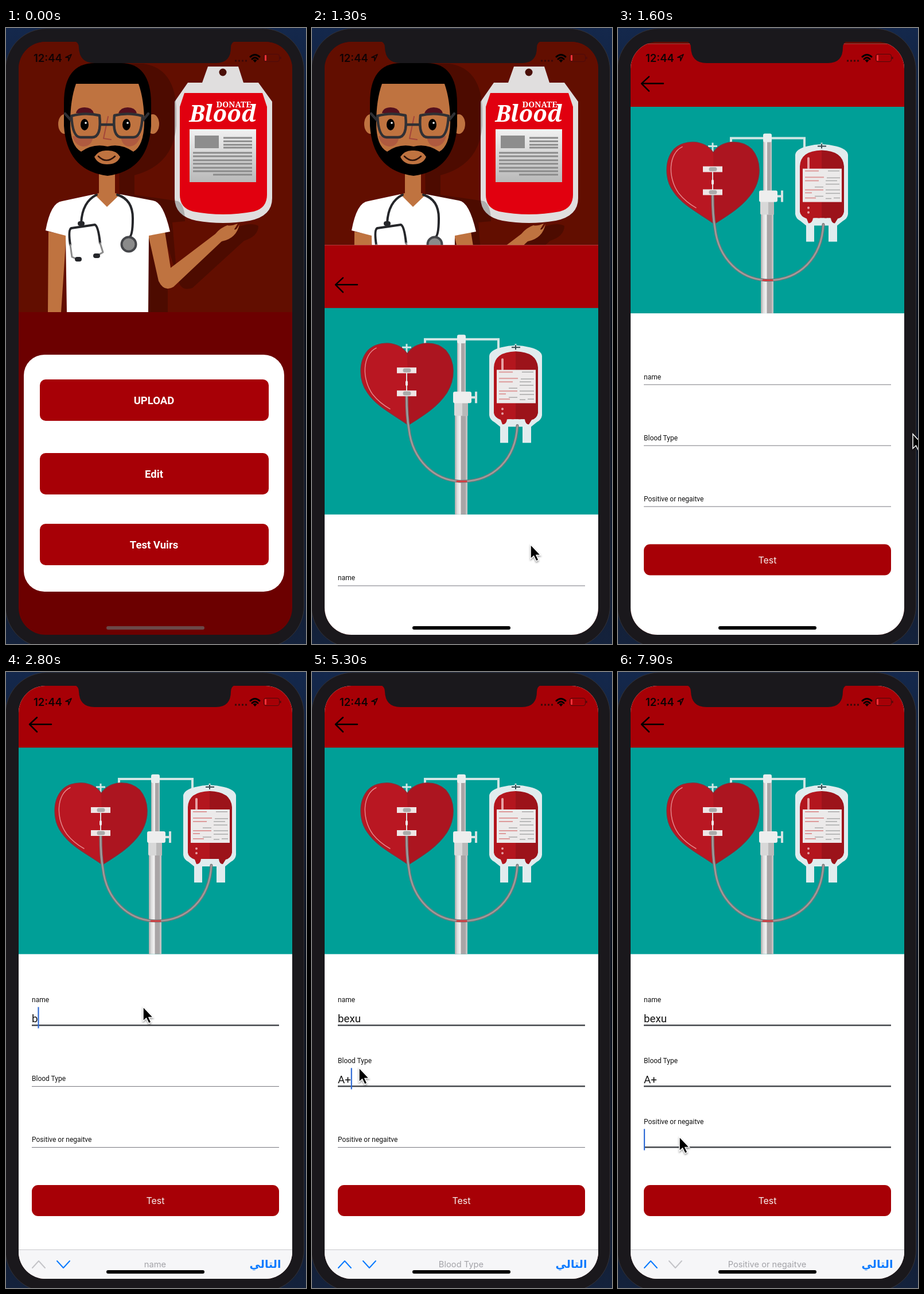
These frames come from a looping animation (523x1071 px, 8 s). An HTML page:

```html
<!DOCTYPE html>
<html lang="en">
<head>
<meta charset="utf-8">
<style>
html, body { margin: 0; width: 100%; height: 100%; overflow: hidden; background: #0b1222; }
svg { display: block; width: 523px; height: 1071px; }
text { font-family: Roboto, sans-serif; }
.mid { text-anchor: middle; }
.inter { font-family: Inter, sans-serif; }
.line { fill: none; stroke-linecap: round; stroke-linejoin: round; }
</style>
</head>
<body>
<svg viewBox="0 0 523 1071">
  <defs>
    <clipPath id="screen"><rect x="22" y="24" width="477" height="1031" rx="47"/></clipPath>
    <clipPath id="art"><rect x="22" y="24" width="477" height="470"/></clipPath>
    <linearGradient id="paper" x2="0" y2="1"><stop stop-color="#f1f1f1"/><stop offset="1" stop-color="#b9b9b9"/></linearGradient>
    <linearGradient id="night" x2="0" y2="1"><stop stop-color="#14284c"/><stop offset=".5" stop-color="#080d18"/><stop offset="1" stop-color="#14223c"/></linearGradient>
    <linearGradient id="pole">
      <stop stop-color="#aaa"/><stop offset=".2" stop-color="#ddd"/><stop offset=".45" stop-color="#f4f4f4"/>
      <stop offset=".5" stop-color="#a9a5a6"/><stop offset=".8" stop-color="#a9a5a6"/><stop offset="1" stop-color="#d0d0d0"/>
    </linearGradient>
  </defs>

  <rect width="523" height="1071" fill="url(#night)"/>
  <rect x="-1" y="1" width="520.5" height="1076" rx="72" fill="#1a181c" stroke="#333238"/>

  <g clip-path="url(#screen)">
    <g id="home">
      <rect x="22" y="24" width="477" height="1031" fill="#6c0000"/>
      <g clip-path="url(#art)">
        <rect x="22" y="24" width="477" height="470" fill="#620e00"/>

        <g id="donation">
          <path fill="#e0dede" d="M352 67H405L414 95H440L464 128V296Q464 327 425 335Q378 343 332 335Q294 327 294 296V128L317 95H342Z"/>
          <circle cx="378" cy="77" r="6.5" fill="#4a0f08"/>
          <path fill="#e1000f" d="M311 113H447L455 137V290Q455 313 432 319Q378 329 326 319Q303 313 303 290V137Z"/>
          <g fill="#fff" class="mid" font-weight="700">
            <text x="378" y="163" font-size="40" font-style="italic" style="font-family:'Noto Serif',serif">Blood</text>
            <text x="397" y="138" font-size="14" style="font-family:'Noto Serif',serif">DONATE</text>
          </g>
          <rect x="320" y="176" width="116" height="92" fill="url(#paper)"/>
          <rect x="329" y="187" width="42" height="22" fill="#8d8d8d"/>
          <path stroke="#8b8b8b" stroke-width="3" d="M379 191h50m-50 6h50m-50 6h50m-50 5h50M326 217h103m-103 6h103m-103 7h103m-103 6h103m-103 7h103m-103 6h103M361 255h68"/>
        </g>

        <path fill="#000" opacity=".22" d="M195 62H240Q294 70 297 140V170Q292 238 224 256V290L300 301Q312 308 312 336L290 338L296 410L322 418L395 350Q425 336 440 344Q440 362 415 370L325 452Q308 458 302 444L282 380V494H200Z"/>

        <g id="doctor">
          <g fill="#bf7340">
            <path d="M74 354L73 494H96L105 360ZM248 360L266 440Q276 460 292 450L376 371Q402 366 407 341Q401 353 398 350L404 340Q392 345 386 343Q374 347 365 358L287 417L277 354Z"/>
            <path d="M162 245H190V287L203 291L177 313L150 291L162 287Z"/>
            <ellipse cx="102" cy="167" rx="11" ry="17"/><ellipse cx="256" cy="167" rx="11" ry="17"/>
          </g>
          <path fill="#fff" d="M69 352Q78 303 98 301L154 289L176 311L199 289L256 300Q274 302 286 354L249 361L248 494H106L104 361Z"/>
          <path d="M101 130Q101 61 155 61H200Q252 61 253 130V170Q248 248 177 257Q106 248 101 170Z"/>
          <path fill="#bf7340" d="M122 97H231Q241 125 241 165Q240 205 222 215Q200 200 177 206Q152 200 131 215Q112 205 112 165Q112 125 122 97Z"/>
          <path fill="#bf7340" d="M154 224Q162 212 176 213Q192 212 199 224Q194 237 176 237Q160 237 154 224Z"/>
          <path class="line" stroke="#30140b" stroke-width="2.5" d="M161 223Q175 237 190 223"/>
          <path fill="#a8503f" d="M116 188H152Q150 206 134 206Q120 204 116 188ZM200 188H234Q230 204 216 206Q202 206 200 188Z" opacity=".7"/>
          <path fill="#55101d" d="M122 148Q124 138 137 138Q150 138 153 148ZM196 148Q200 138 212 138Q225 138 228 148Z"/>
          <ellipse cx="137" cy="168" rx="7" ry="10"/><ellipse cx="210" cy="168" rx="7" ry="10"/>
          <circle cx="139" cy="165" r="1.8" fill="#fff"/><circle cx="212" cy="165" r="1.8" fill="#fff"/>
          <path class="line" stroke="#a3463a" stroke-width="2" d="M178 154L170 192L183 194"/>
          <path class="line" stroke="#303034" stroke-width="4.5" d="M114 153Q137 146 163 152Q167 190 150 190H130Q116 190 114 153ZM189 152Q214 146 238 153Q236 190 222 190H202Q185 190 189 152ZM164 168H188M113 160L103 149M239 160L248 149"/>
          <path class="line" stroke="#25262a" stroke-width="4" d="M158 290Q133 302 131 339M194 290Q221 298 221 331T214 364M112 377Q108 350 114 348L155 342Q161 345 164 374"/>
          <path class="line" stroke="#8c8c8c" stroke-width="3" d="M112 377L115 398L124 402M164 374L169 390L158 396"/>
          <path class="line" stroke="#25262a" stroke-width="8" d="M124 402l4 0M156 396l4 0M129 340l4 0"/>
          <circle cx="214" cy="376" r="12.5" fill="#8a8a8a" stroke="#45464a" stroke-width="4"/>
        </g>
      </g>
      <rect x="31" y="568" width="454" height="412" rx="36" fill="#fff"/>
      <g id="menu"></g>
    </g>

    <g id="modal">
      <rect x="22" y="22" width="477" height="1050" fill="#fff"/>
      <rect x="22" y="22" width="477" height="110" fill="#a70006"/>
      <path class="line" stroke="#000" stroke-width="2.5" d="M79 91H41L54 79M41 91L54 104"/>
      <rect x="22" y="131.5" width="477" height="359" fill="#009f97"/>

      <g id="stand">
        <path fill="none" stroke="#cfe6e4" stroke-width="4" d="M197 196V186H325V212"/>
        <rect x="253" y="190" width="15" height="90" fill="url(#pole)"/>
        <rect x="249" y="315" width="22" height="175.500" fill="url(#pole)"/>
        <rect x="248" y="294" width="24" height="25" rx="2" fill="#d8d8d8"/><path fill="#b9b9b9" d="M262 297h10v22h-10z"/>
        <rect x="246" y="277" width="32" height="20" rx="3" fill="#eee"/>
        <path stroke="#d5e2e2" stroke-width="4" d="M278 287H286M286 277V297"/>
        <rect x="253" y="178" width="15" height="15" rx="3" fill="#e8eeee"/>
        <path fill="none" stroke="#cfe6e4" stroke-width="3" d="M165 194V218M157 200H173M355 194V210"/>
      </g>

      <g id="heart">
        <path id="heartShape" fill="#b91722" stroke="#8f2a35" stroke-width="1.5" d="M166 211C150 188 115 188 98 205C80 225 82 259 97 279C114 304 145 318 168 335C195 318 218 304 235 279C250 255 250 225 233 205C215 188 182 188 166 211Z"/>
        <path fill="#000" opacity=".07" d="M166 211C182 188 215 188 233 205C250 225 250 255 235 279C218 304 195 318 168 335Z"/>
        <path class="line" stroke="#e3868a" stroke-width="1.5" d="M112 201C88 212 86 255 106 282Q118 297 136 307"/>
      </g>

      <g id="bloodBag">
        <path fill="#e1ecee" d="M330 200Q355 193 380 200Q400 205 401 215V318Q400 326 392 330L382 338V366H367V338H342V366H328V338L318 330Q310 326 309 318V215Q310 205 330 200Z"/>
        <path fill="#b3161e" d="M317 235Q318 208 355 207Q392 208 394 235V314Q392 324 383 326L378 334Q372 334 371 325H340Q339 334 332 334L329 326Q318 322 317 314Z"/>
        <path fill="#000" opacity=".13" d="M355 207Q392 208 394 235V314Q392 324 383 326L378 334Q372 334 371 325H355Z"/>
        <path stroke="#33494e" stroke-width="2" d="M348 200H363M355 196V204"/>
        <path class="line" stroke="#e6a2a5" stroke-width="4" d="M332 221V238M332 307v.1M332 315v.1"/>
        <rect x="322" y="239" width="68" height="58" fill="#eceaea"/>
        <path stroke="#dd9b9b" stroke-width="2" d="M326 243H350M326 254H359M326 260H350M326 276H358M326 281H338M326 290H345"/>
        <path stroke="#aaa" stroke-width="1.500" d="M366 243H386M364 255H387M362 260H382M362 266H386M343 271H358M362 276H387M362 282H387M343 287H358M362 291H372M376 290H387"/>
        <path fill="#e1ecee" d="M342 325h6v11h-6zM352 325h8v11h-8zM364 325h6v11h-6z"/>
      </g>

      <g id="tube" class="line">
        <path stroke="#777b7c" stroke-width="5" d="M165 286Q165 320 169 342C175 395 213 433 263 433C317 432 355 394 358 336"/>
        <path stroke="#aaa1a1" stroke-width="2" d="M165 286Q165 320 169 342C175 395 213 433 263 433C317 432 355 394 358 336"/>
        <path stroke="#d63c40" stroke-width="3" d="M253 433H269"/>
        <path stroke="#ddd" stroke-width="2" d="M165 245V276"/><path stroke="#eee" stroke-width="4" d="M165 260V265"/>
        <path stroke="#eee5e5" stroke-width="10" stroke-linecap="butt" d="M148 240H182M148 280H182"/>
        <path stroke="#aaa" stroke-width="7" d="M162 240H169M162 280H169"/>
      </g>

      <g id="form"></g>
      <rect x="45" y="892" width="431" height="54" rx="11" fill="#a70006"/>
      <text class="mid inter" x="260.500" y="925" font-size="16" fill="#f7eeee">Test</text>
    </g>

    <g id="toolbar">
      <rect x="22" y="1004" width="477" height="60" fill="#f6f6f8"/>
      <path stroke="#c8c8cc" d="M22 1004.500H499"/>
      <path id="prev" class="line" stroke-width="2" d="M46 1036L57 1024L68 1036"/>
      <path id="next" class="line" stroke-width="2" d="M89 1024L100 1036L111 1024"/>
      <text id="title" class="mid inter" x="260" y="1035" font-size="14.700" fill="#a3a3a8"></text>
      <text class="mid" x="452" y="1036" font-size="19" font-weight="700" fill="#0a7aff" style="font-family:'DejaVu Sans',sans-serif">التالي</text>
    </g>
    <rect id="indicator" x="175" y="1040" width="171" height="6" rx="3"/>
  </g>

  <path fill="#1a181c" d="M117 22Q127 24 127 34Q128 61 154 61H366Q392 61 392 34Q392 24 402 22Z"/>
  <g id="status">
    <text class="inter" x="48" y="58.500" font-size="18.500" font-weight="600" fill="#120304">12:44</text>
    <path class="line" stroke="#120304" stroke-width="1.800" d="M114 46L104 51H109V57Z"/>
    <path stroke="#3b0808" stroke-width="3" stroke-dasharray="3 3" d="M399 57H420"/>
    <path class="line" stroke="#000" stroke-width="3" stroke-linecap="butt" d="M426 50Q434 43 442 50M429 54Q434 49 439 54"/><path d="M430.500 56Q434 53 437.500 56L434 60Z"/>
    <rect x="449.500" y="45.500" width="27" height="13" rx="3.500" fill="none" stroke="#4d0a0b"/><path d="M478.500 50v4" stroke="#4d0a0b" stroke-width="2"/>
    <rect x="451" y="47" width="3" height="10" rx="1" fill="#f03038"/>
  </g>
  <path id="cursor" stroke="#fff" stroke-width="1.500" style="filter:drop-shadow(0 2px 1.500px #0006)" d="M0 0V25L5.500 20L10 29L14 27L10 18.500H17.500Z"/>
</svg>

<script>
const $ = id => document.getElementById(id);
const LOOP = 8000, STEP = 100;
const clamp = u => Math.max(0, Math.min(1, u));
const ease = u => u < .5 ? 2 * u * u : 1 - 2 * (1 - u) ** 2;

$('menu').innerHTML = [['UPLOAD', 611], ['Edit', 739], ['Test Vuirs', 862]].map(([label, y]) => `
  <g><rect x="59" y="${y}" width="399" height="72" rx="10" fill="#a70006"/>
  <text class="mid" x="258" y="${y + 43}" font-size="18.500" font-weight="600" fill="#fff">${label}</text></g>`).join('');

// focus: when the field is tapped; keys: when each character appears
const fields = [
  { label: 'name', value: 'bexu', focus: 2300, keys: [2800, 2900, 3100, 3300] },
  { label: 'Blood Type', value: 'A+', focus: 4116, keys: [4900, 5300] },
  { label: 'Positive or negaitve', value: '', focus: 6167, keys: [] }
];
$('form').innerHTML = fields.map((f, i) => `
  <g transform="translate(45 ${614.5 + i * 106})">
    <path d="M0 0H431" stroke="#77777f"/>
    <rect y="-1.500" height="2.500" fill="#45484d"/>
    <text class="label" font-size="12" fill="#111">${f.label}</text>
    <text class="value" y="-6" font-size="18.700" fill="#111"></text>
    <path class="caret" d="M1 -32V5" stroke="#2f6bd6" stroke-width="2.200"/>
  </g>`).join('');
fields.forEach((f, i) => {
  const g = $('form').children[i];
  f.bar = g.querySelector('rect');
  f.text = g.querySelector('.label');
  f.typed = g.querySelector('.value');
  f.caret = g.querySelector('.caret');
});

// time, x, y of the pointer
const path = [
  [0, 540, 760], [200, 540, 760], [800, 300, 905], [1150, 300, 905], [1300, 381, 898],
  [1600, 514, 706], [1700, 540, 690], [1900, 540, 670], [2300, 239, 582], [3500, 239, 582],
  [4000, 82, 688], [5700, 82, 688], [6100, 136, 790], [6400, 136, 790], [6900, 107, 808], [8000, 107, 808]
];

function pointerAt(t) {
  const i = path.findIndex(p => p[0] > t);
  const [t0, x0, y0] = path[i - 1], [t1, x1, y1] = path[i];
  const u = (t - t0) / (t1 - t0);
  return `translate(${x0 + (x1 - x0) * u} ${y0 + (y1 - y0) * u})`;
}

// critically damped spring, sliding the sheet up
function sheetOffset(t) {
  const s = Math.max(0, t - 1168) * .017;
  return 1033 * (1 + s) * Math.exp(-s);
}

function drawField(f, t, active) {
  const p = ease(clamp((t - f.focus) / 300));
  f.bar.setAttribute('width', 431 * p);
  f.text.setAttribute('y', p < .15 ? -9.5 : -40.5);
  f.text.setAttribute('opacity', p < .15 ? 1 - p / .15 : clamp((p - .83) / .17));
  const count = f.keys.filter(k => k <= t).length;
  f.typed.textContent = f.value.slice(0, count);
  const blink = (t - (f.keys[count - 1] || f.focus)) % 1000;
  f.caret.style.display = active && (blink < 500 || blink >= 700) ? '' : 'none';
  f.caret.setAttribute('transform', `translate(${count ? f.typed.getComputedTextLength() : 0} 0)`);
}

function draw(t) {
  const offset = sheetOffset(t);
  $('modal').setAttribute('transform', `translate(0 ${offset < .5 ? 0 : offset})`);
  $('menu').lastElementChild.setAttribute('opacity', t >= 1000 && t < 1200 ? .5 : 1);
  $('indicator').setAttribute('fill', t < 1200 ? '#6b4848' : '#000');

  const current = fields.filter(f => f.focus <= t).length - 1;
  fields.forEach((f, i) => drawField(f, t, i === current));

  $('toolbar').setAttribute('transform', `translate(0 ${60 * (1 - ease(clamp((t - 2300) / 250)))})`);
  $('title').textContent = fields[Math.max(0, current)].label;
  $('prev').setAttribute('stroke', current > 0 ? '#0a7aff' : '#c4c4c8');
  $('next').setAttribute('stroke', current < 2 ? '#0a7aff' : '#c4c4c8');
  $('cursor').setAttribute('transform', pointerAt(t));
}

const start = performance.now();
function tick() {
  const t = (performance.now() - start) % LOOP;
  draw(Math.floor(t / STEP) * STEP);
  requestAnimationFrame(tick);
}
tick();
</script>
</body>
</html>
```
